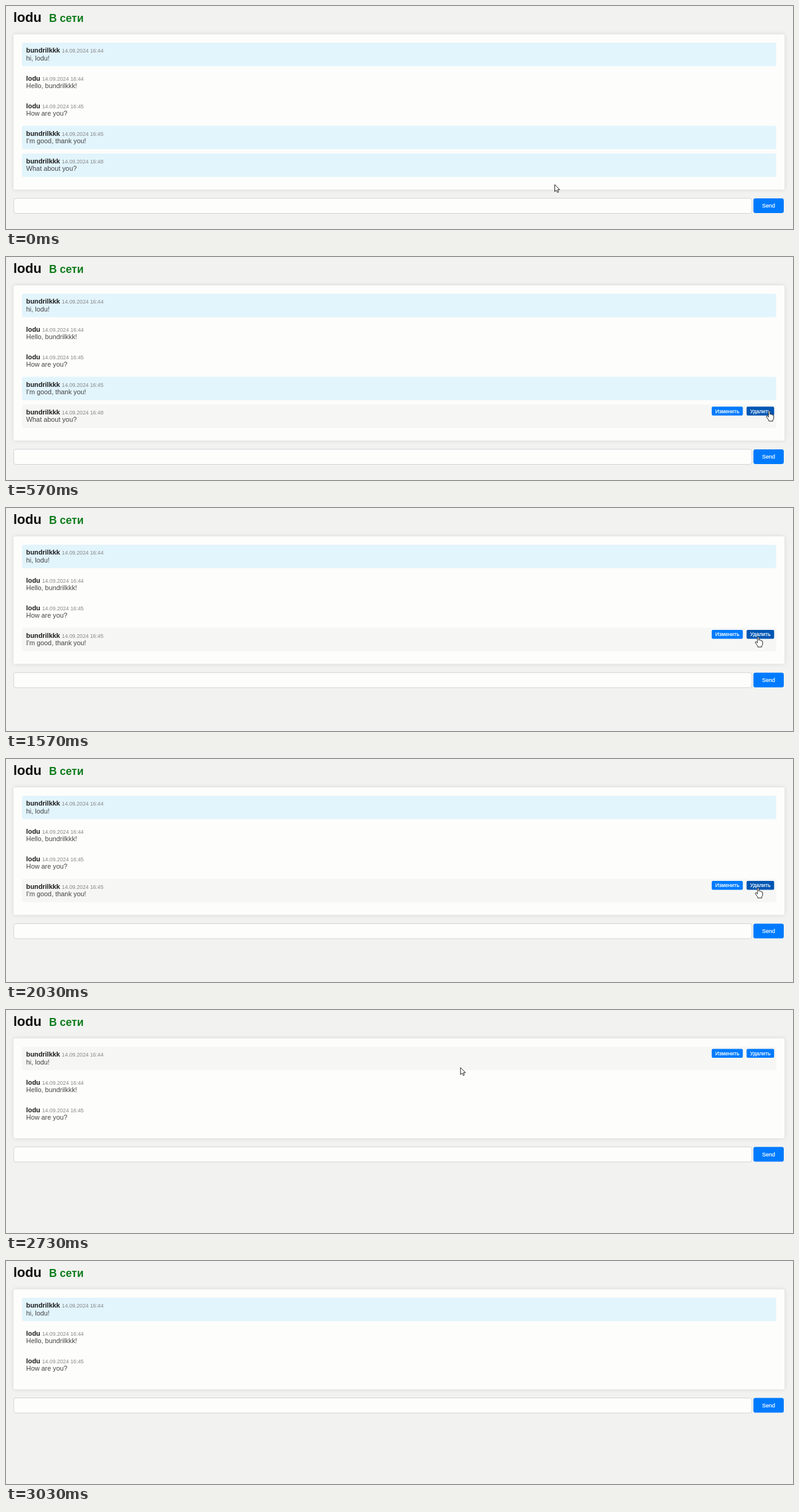
Write an HTML page that moves like this. It is 1280 by 364 pixels and loops after 3460 ms.

```html
<!DOCTYPE html>
<html lang="ru">
<head>
<meta charset="utf-8">
<title>Chat</title>
<style>
  html, body { margin: 0; width: 100%; height: 100%; overflow: hidden; background: #f2f2f0; }
  svg { display: block; font: 10.88px "Liberation Sans", Arial, sans-serif; }
  text { white-space: pre; }
  .title { font-size: 21.76px; font-weight: bold; fill: #0c0c0c; }
  .status { font-size: 17.6px; font-weight: bold; fill: #0f7c1c; }
  .card { fill: #fdfdfb; filter: drop-shadow(0 0 3.4px rgba(0, 0, 0, .12)); }
  .row { fill: none; }
  .own .row { fill: #e2f4fc; }
  .hover .row { fill: #f6f6f5; }
  .name { font-weight: bold; fill: #1c1c1c; }
  .date { font-size: 8.7px; fill: #868686; }
  .body { fill: #444; }
  .tools { display: none; font-size: 8.7px; }
  .own.hover .tools { display: inline; }
  .button { fill: #007bff; }
  .button.active { fill: #0056b3; }
  .label { fill: #fff; stroke: #fff; stroke-width: .2; text-anchor: middle; }
  .input { fill: #fdfdfb; stroke: #ccccd4; stroke-width: .8; }
  .cursor { fill: #fff; stroke: #111; stroke-width: .9; stroke-linejoin: round; }
</style>
</head>
<body>
<svg width="1280" height="364" viewBox="0 0 1280 364">
  <text class="title" x="12" y="26">lodu</text>
  <text class="status" x="69.9" y="26">В сети</text>
  <rect class="card" id="card" x="12.2" y="46.2" width="1254" rx="3.4"/>
  <g id="list"></g>
  <g id="form">
    <rect class="input" x="12.6" y="13.9" width="1200.4" height="24.6" rx="3.4"/>
    <rect class="button" x="1215.6" y="14" width="49.4" height="24" rx="3.4"/>
    <text class="label" x="1240.3" y="29" font-size="9.07">Send</text>
  </g>
  <g class="cursor" id="cursor">
    <path id="arrow" d="M.5 .5V12L3.2 9.6 5 13.4 6.8 12.6 5.1 8.9H8.6Z"/>
    <path id="hand" transform="translate(.6 .3)" d="M-1.4 8.5V1.2Q-1.4 0 -.3 0T.8 1.2V5.4Q1.2 4.5 2 4.7T3 6Q3.4 5.2 4.2 5.4T5.1 6.8Q6.9 6 7 8V11.5Q7 13.3 5.6 14.6V16.6H-.9V14.9Q-2.6 13.2 -4.6 9.9 -5.3 8.3 -4.2 7.9 -3 7.5 -1.4 10Z"/>
  </g>
</svg>
<script>
const LOOP = 3460, TOP = 60, PITCH = 45.2, ROW_HEIGHT = 38.2;
const $ = id => document.getElementById(id);

// author, minute, text, time of deletion
const messages = [
  ["bundrilkkk", 44, "hi, lodu!"],
  ["lodu", 44, "Hello, bundrilkkk!"],
  ["lodu", 45, "How are you?"],
  ["bundrilkkk", 45, "I'm good, thank you!", 2200],
  ["bundrilkkk", 48, "What about you?", 1200],
];
const tools = [
  { x: 1147.8, width: 50.6, label: "Изменить" },
  { x: 1204.5, width: 44.8, label: "Удалить" },
];

const toolMarkup = ({ x, width, label }) => `
  <rect class="button" x="${x}" y="3.5" width="${width}" height="14.4" rx="2"/>
  <text class="label" x="${x + width / 2}" y="13.8">${label}</text>`;

$("list").innerHTML = messages.map(([author, minute, body], i) => `
  <g class="message" transform="translate(0 ${TOP + i * PITCH})">
    <rect class="row" x="26" width="1226.5" height="${ROW_HEIGHT}" rx="3.4"/>
    <text x="32.8" y="16.4"><tspan class="name">${author}</tspan> <tspan class="date">14.09.2024 16:${minute}</tspan></text>
    <text class="body" x="32.8" y="28.6">${body}</text>
    <g class="tools">${tools.map(toolMarkup).join("")}</g>
  </g>`).join("");

const rows = [...document.querySelectorAll(".message")];

// pointer stops: time, x, y, easing towards the stop
const linear = p => p;
const smooth = p => p * p * (3 - 2 * p);
const stops = [
  [30, 892, 291, linear],
  [530, 1241, 251, smooth],
  [1200, 1241, 251, linear],
  [1560, 1223, 210, smooth],
  [2440, 1223, 210, linear],
  [2470, 1112, 212, linear],
  [2800, 640, 62, linear],
  [2970, 560, -20, linear],
];

function pointerAt(t) {
  const next = stops.findIndex(stop => stop[0] > t);
  if (next < 1) return (next ? stops[stops.length - 1] : stops[0]).slice(1, 3);
  const [t0, x0, y0] = stops[next - 1], [t1, x1, y1, ease] = stops[next];
  const p = ease((t - t0) / (t1 - t0));
  return [x0 + (x1 - x0) * p, y0 + (y1 - y0) * p];
}

function draw(t) {
  const [x, y] = pointerAt(t);
  let count = 0, pointing = false;
  rows.forEach((row, i) => {
    const [author, , , deleted = Infinity] = messages[i];
    const visible = t < deleted, own = author === messages[0][0];
    const localY = y - TOP - i * PITCH;
    const hover = visible && localY >= 0 && localY <= ROW_HEIGHT;
    count += visible;
    row.style.display = visible ? "" : "none";
    row.classList.toggle("own", own);
    row.classList.toggle("hover", hover);
    row.querySelectorAll(".button").forEach((button, k) => {
      const { x: left, width } = tools[k];
      const active = own && hover && localY > 3.5 && localY < 17.9 && x > left && x < left + width;
      button.classList.toggle("active", active);
      pointing ||= active;
    });
  });
  $("card").setAttribute("height", 27.6 + count * PITCH);
  $("form").setAttribute("transform", `translate(0 ${74 + count * PITCH})`);
  $("cursor").setAttribute("transform", `translate(${x} ${y})`);
  $("arrow").style.display = pointing ? "none" : "";
  $("hand").style.display = pointing ? "" : "none";
}

const start = performance.now();
function tick() {
  draw((performance.now() - start) % LOOP);
  requestAnimationFrame(tick);
}
tick();
</script>
</body>
</html>
```
